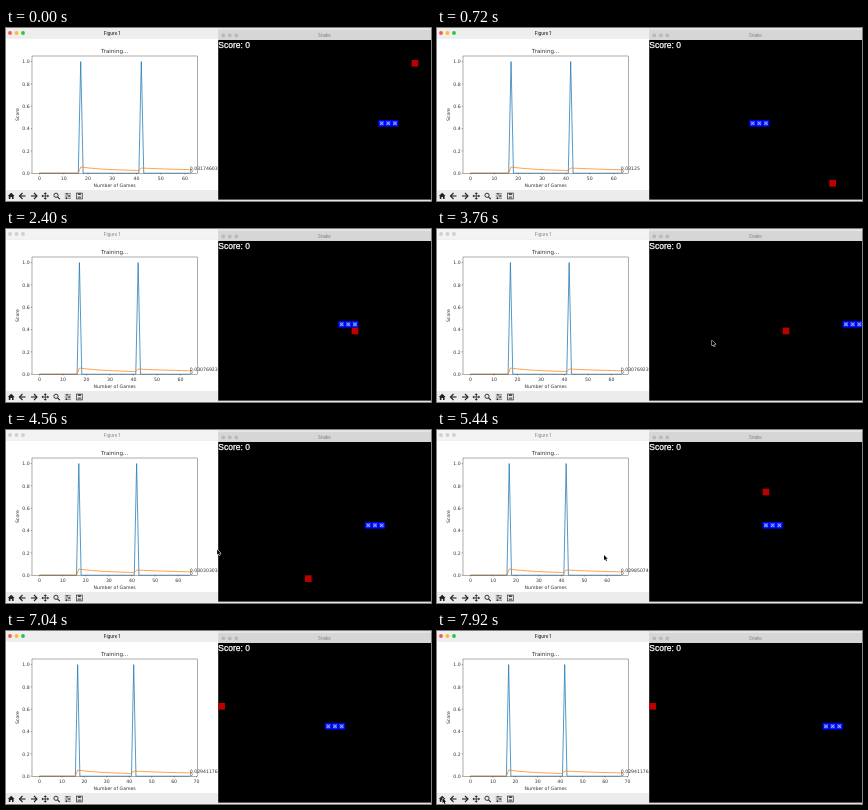
Write an HTML page with a canvas that moves like this. It is 425 px wide and 173 px high and loops after 8 s.

```html
<!DOCTYPE html>
<html lang="en">
<head>
<meta charset="utf-8">
<title>Snake training</title>
<style>
html, body { margin: 0; width: 100%; height: 100%; overflow: hidden; background: #fff; }
canvas { display: block; width: 425px; height: 173px; }
</style>
</head>
<body>
<canvas id="stage"></canvas>
<script>
const W = 425, H = 173, LOOP = 8000, STEP = 90, PLOT_LEAD = 80;
const canvas = document.getElementById('stage');
const ctx = canvas.getContext('2d');
const ratio = window.devicePixelRatio || 1;
canvas.width = W * ratio;
canvas.height = H * ratio;

const PLOT_FONT = '"DejaVu Sans", sans-serif';
const UI_FONT = 'Inter, sans-serif';
const AXES = { left: 26, right: 191.3, top: 28, bottom: 145.2 };
const FIELD = { x: 212.3, y: 12, scale: 1 / 3, block: 20 };
const HITS = [17, 42];

// start: time of the first step; shown: first repaint after the plot pause
const games = [
  { count: 63, start: -820, food: [580, 60] },
  { count: 64, start: 690, food: [540, 420] },
  { count: 65, start: 2100, food: [400, 260] },
  { count: 66, start: 3860, food: [260, 400] },
  { count: 67, start: 5300, shown: 5440, first: 3, food: [340, 140] },
  { count: 68, start: 6890, food: [0, 180] }
];
const shownAt = game => game.shown ?? game.start;
const latest = (t, lead = 0) => games.filter(g => shownAt(g) - lead <= t).pop();

function rect(x, y, w, h, color) {
  ctx.fillStyle = color;
  ctx.fillRect(x, y, w, h);
}

function text(value, x, y, size, { color = '#333', align = 'center', font = PLOT_FONT, weight = 400 } = {}) {
  ctx.font = `${weight} ${size}px ${font}`;
  ctx.textAlign = align;
  ctx.textBaseline = 'alphabetic';
  ctx.fillStyle = color;
  ctx.fillText(value, x, y);
}

function line(points, color, width) {
  ctx.beginPath();
  points.forEach(([x, y]) => ctx.lineTo(x, y));
  ctx.strokeStyle = color;
  ctx.lineWidth = width;
  ctx.stroke();
}

function shape(points, color) {
  ctx.beginPath();
  points.forEach(([x, y]) => ctx.lineTo(x, y));
  ctx.closePath();
  ctx.fillStyle = color;
  ctx.fill();
}

function lights(x, y, colors) {
  colors.forEach((color, i) => {
    ctx.beginPath();
    ctx.arc(x + i * 6.5, y, 1.9, 0, 7);
    ctx.fillStyle = color;
    ctx.fill();
  });
}

function drawPlot(count) {
  const { left, right, top, bottom } = AXES;
  const pad = (right - left) / 22;
  const px = i => left + pad + i * (right - left - 2 * pad) / (count - 1);
  const py = v => bottom - v * (bottom - top) / 1.05;
  const scores = Array.from({ length: count }, (_, i) => HITS.includes(i) ? 1 : 0);
  let total = 0;
  const means = scores.map((score, i) => (total += score) / (i + 1));
  const curve = values => values.map((v, i) => [px(i), py(v)]);

  text('Training...', (left + right) / 2, 25.2, 5.55);
  text('Number of Games', (left + right) / 2, 158.6, 4.63);
  ctx.save();
  ctx.translate(13.3, (top + bottom) / 2);
  ctx.rotate(-Math.PI / 2);
  text('Score', 0, 0, 4.63);
  ctx.restore();

  ctx.save();
  ctx.beginPath();
  ctx.rect(left, top, right - left, bottom - top + 0.5);
  ctx.clip();
  ctx.lineJoin = 'round';
  line(curve(scores), '#1f77b4', 0.75);
  line(curve(means), '#ff7f0e', 0.75);
  ctx.restore();

  ctx.strokeStyle = '#333';
  ctx.lineWidth = 0.4;
  ctx.strokeRect(left, top, right - left, bottom - top);
  for (let i = 0; px(i) <= right; i += 10) {
    line([[px(i), bottom], [px(i), bottom + 1.3]], '#333', 0.4);
    text(i, px(i), bottom + 6.4, 4.63);
  }
  for (let i = 0; i <= 5; i++) {
    const v = i / 5;
    line([[left - 1.3, py(v)], [left, py(v)]], '#333', 0.4);
    text(v.toFixed(1), left - 2.4, py(v) + 1.7, 4.63, { align: 'right' });
  }
  text('0', px(count - 1), py(0), 4.63, { align: 'left' });
  text(String(means[count - 1]), px(count - 1), py(means[count - 1]), 4.63, { align: 'left' });
}

function drawToolbar() {
  const ink = '#222', y = 168;
  rect(0, 162, 212, 11, '#ececec');
  shape([[1.8, y], [5.2, y - 3.3], [8.6, y], [7.6, y], [7.6, y + 3], [6, y + 3],
    [6, y + 1], [4.4, y + 1], [4.4, y + 3], [2.8, y + 3], [2.8, y]], ink);
  for (const [x, d] of [[16.5, 1], [28, -1]]) {
    line([[x - 3 * d, y], [x + 3 * d, y]], ink, 1.1);
    line([[x, y - 3], [x - 3 * d, y], [x, y + 3]], ink, 1.1);
  }
  for (let i = 0; i < 4; i++) {
    ctx.save();
    ctx.translate(39.3, y);
    ctx.rotate(i * Math.PI / 2);
    line([[0, 0], [0, -3]], ink, 0.8);
    shape([[-1.5, -2.1], [0, -3.8], [1.5, -2.1]], ink);
    ctx.restore();
  }
  ctx.beginPath();
  ctx.arc(50, y - 0.7, 2.1, 0, 7);
  ctx.lineWidth = 0.9;
  ctx.strokeStyle = ink;
  ctx.stroke();
  line([[51.5, y + 0.8], [53.8, y + 3.1]], ink, 1.1);
  [-0.9, 1.2, -1.5].forEach((knob, i) => {
    const row = y - 2.2 + i * 2.2;
    line([[58.8, row], [65, row]], ink, 0.6);
    rect(61.4 + knob, row - 0.9, 1, 1.8, ink);
  });
  ctx.lineWidth = 0.8;
  ctx.strokeStyle = '#444';
  ctx.strokeRect(70.5, y - 2.9, 5.8, 5.8);
  rect(71.9, y - 2.8, 3, 1.8, '#444');
  rect(71.7, y + 0.4, 3.4, 2.3, '#777');
}

function drawFigure(t) {
  const focused = t < 2000 || t >= 5640;
  ctx.save();
  ctx.beginPath();
  ctx.rect(0, 0, 212, H);
  ctx.clip();
  rect(0, 0, 212, H, '#fff');
  rect(0, 0, 212, 10, focused ? '#eeeeee' : '#f3f3f3');
  rect(0, 10, 212, 0.4, '#d8d8d8');
  lights(4, 5, focused ? ['#fb5750', '#fcbb2e', '#29c540'] : Array(3).fill('#cfcfcf'));
  text('Figure 1', 106, 6.6, 4.4, { font: UI_FONT, weight: 600, color: focused ? '#333' : '#999' });
  drawPlot(latest(t, PLOT_LEAD).count);
  drawToolbar();
  ctx.restore();
}

function block(x, y, color) {
  const size = FIELD.block * FIELD.scale;
  const left = FIELD.x + x * FIELD.scale, top = FIELD.y + y * FIELD.scale;
  rect(left, top, size, size, color);
  return [left + size / 2, top + size / 2];
}

function drawGame(t) {
  const game = latest(t);
  const steps = Math.floor((t - game.start) / STEP) + 1;
  const head = 320 + FIELD.block * Math.min(15, Math.max(game.first ?? 1, steps));
  rect(212.3, 0, 213, H, '#e4e4e4');
  rect(212.3, 2, 213, 10, '#d6d6d6');
  lights(217.3, 7.4, Array(3).fill('#b9b9b9'));
  text('Snake', 318.5, 9, 4.4, { font: UI_FONT, weight: 500, color: '#888' });
  rect(FIELD.x, FIELD.y, 213, 159.6, '#000');
  for (let i = 0; i < 3; i++) {
    const [x, y] = block(head - i * FIELD.block, 240, '#0000ff');
    rect(x - 2, y - 2, 4, 4, '#2a5cff');
    line([[x - 1.7, y - 1.7], [x + 1.7, y + 1.7]], '#b4c4ff', 0.7);
    line([[x + 1.7, y - 1.7], [x - 1.7, y + 1.7]], '#b4c4ff', 0.7);
  }
  block(...game.food, '#bb0000');
  text('Score: 0', 212.3, 20.2, 8.5,
    { color: '#fff', align: 'left', font: '"Liberation Sans", Arial, sans-serif' });
  ctx.lineWidth = 0.25;
  ctx.strokeStyle = '#fff';
  ctx.strokeText('Score: 0', 212.3, 20.2);
}

// [time, x, y]; the pointer is hidden outside its stretches
const pointerPaths = [
  [[3600, 275, 111.5], [4000, 275, 111.5], [5000, 167, 125], [5640, 167, 125], [6080, 120, 174]],
  [[7000, 20, 174], [7280, 5.5, 167], [8000, 5.5, 167]]
];

function drawPointer(t) {
  for (const path of pointerPaths) {
    const i = path.findIndex(([time]) => time > t);
    if (i < 1) continue;
    const [t0, x0, y0] = path[i - 1], [t1, x1, y1] = path[i];
    const p = (t - t0) / (t1 - t0), ease = p * p * (3 - 2 * p);
    ctx.save();
    ctx.translate(x0 + (x1 - x0) * ease, y0 + (y1 - y0) * ease);
    const arrow = [[0, 0], [0, 5.2], [1.2, 4.1], [2.1, 6.1], [3, 5.7], [2.1, 3.8], [3.7, 3.7]];
    line([...arrow, arrow[0]], '#fff', 1);
    shape(arrow, '#000');
    ctx.restore();
  }
}

function draw(now) {
  const t = now % LOOP;
  ctx.setTransform(ratio, 0, 0, ratio, 0, 0);
  drawFigure(t);
  drawGame(t);
  drawPointer(t);
}

const began = performance.now();
function tick() {
  draw(performance.now() - began);
  requestAnimationFrame(tick);
}
tick();
</script>
</body>
</html>
```
